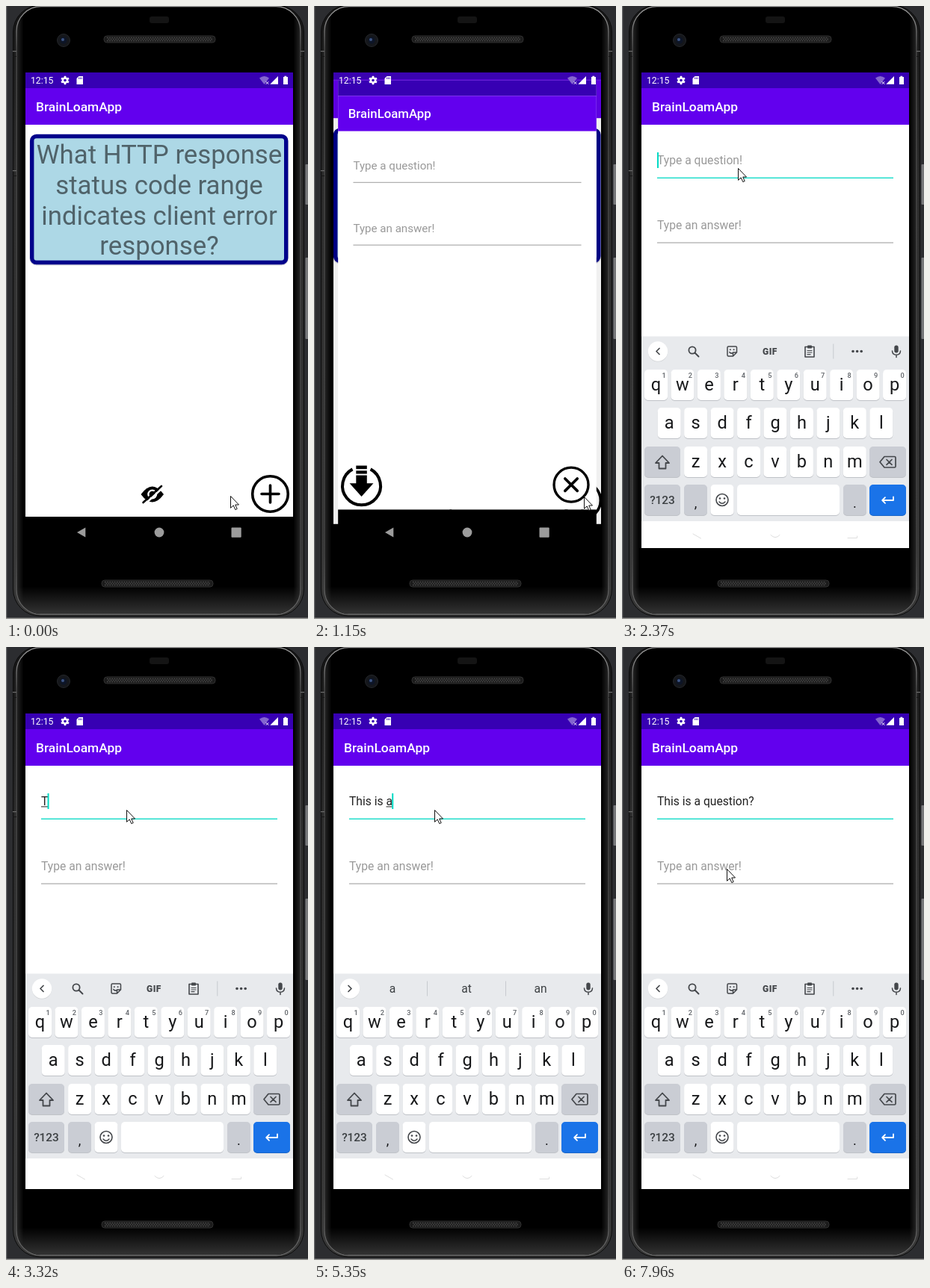
An HTML page that plays this animation: 404 px wide and 821 px high, repeating every 8000 ms.

```html
<!DOCTYPE html>
<html lang="en">
<head>
<meta charset="utf-8">
<title>Study cards demo</title>
<style>
  html, body { margin: 0; width: 100%; height: 100%; overflow: hidden; background: #2c2d30; }
  svg { display: block; width: 404px; height: 821px; }
  text { font-family: Roboto, sans-serif; white-space: pre; }
  .mid { text-anchor: middle; }
  .line { fill: none; stroke-linecap: round; stroke-linejoin: round; }
</style>
</head>
<body>
<svg id="stage" viewBox="0 0 404 821"></svg>
<script>
const LOOP = 8000;
const SIZE = 15.66;
const LEFT = 47;

const rect = (x, y, w, h, fill, r = 0, more = '') =>
  `<rect x="${x}" y="${y}" width="${w}" height="${h}" rx="${r}" fill="${fill}" ${more}/>`;
const circle = (x, y, r, fill, more = '') =>
  `<circle cx="${x}" cy="${y}" r="${r}" fill="${fill}" ${more}/>`;
const path = (d, fill, more = '') => `<path d="${d}" fill="${fill}" ${more}/>`;
const line = (d, color, width) =>
  `<path class="line" d="${d}" stroke="${color}" stroke-width="${width}"/>`;
const label = (x, y, size, fill, str, more = '') =>
  `<text x="${x}" y="${y}" font-size="${size}" fill="${fill}" ${more}>${str}</text>`;
const mid = 'class="mid"';

function speaker(x, y) {
  const row = (dy, shift) =>
    `<path d="M${x + 4 + shift} ${y + dy}H${x + 145}" stroke="#4a4a4a" stroke-width="1.6" stroke-dasharray="1.6 1.6"/>`;
  return rect(x, y, 149, 9, '#1b1b1b', 4, 'stroke="#303030"') +
    row(2.5, 0) + row(4.5, 1.6) + row(6.5, 0);
}

function phone() {
  const tick = (x, y) => rect(x, y, 5, 1.2, '#6c6c6c') + rect(x, y + 7, 5, 1, '#161616');
  return rect(0, 0, 404, 821, '#2c2d30') +
    rect(0, 0, 1.2, 821, '#6a6b6d') +
    rect(0, 819.5, 404, 1.5, '#9b9b98') +
    rect(400.5, 212, 4, 54, '#77787a', 1) +
    rect(400.5, 337, 4, 109, '#77787a', 1) +
    rect(9.5, -1, 389, 818, 'url(#metal)', 36, 'stroke="#0b0b0b"') +
    rect(14, 0.7, 380, 814, 'url(#sides)', 33, 'stroke="url(#rim)" stroke-width="1.3"') +
    rect(14.7, 1.4, 378.6, 812.6, 'url(#foot)', 32) +
    tick(9, 60) + tick(9, 220) + tick(394, 60) +
    rect(192, 14, 26, 9, '#141414', 3) +
    circle(77, 46, 8.5, '#15171b', 'stroke="#24262a"') +
    circle(77, 46, 4.5, '#0d1526') + circle(76, 45, 2, '#3d5484') +
    speaker(131, 40) + speaker(128, 769);
}

function bars() {
  return rect(26, 89, 358, 21, '#3700b3') +
    rect(26, 110, 358, 49, '#6200ee') +
    label(40, 141, 17.4, '#fff', 'BrainLoamApp', 'font-weight="500"');
}

function home() {
  const lines = ['What HTTP response', 'status code range', 'indicates client error', 'response?'];
  return rect(26, 89, 358, 595, '#fff') + bars() +
    rect(31.5, 172.5, 346.5, 175, '#d4d4d8', 9) +
    rect(34.7, 174.5, 340, 169, '#add8e6', 6, 'stroke="#00008b" stroke-width="5.4"') +
    lines.map((s, i) => label(205, 211 + i * 40.8, 34.8, '#50636a', s, mid)).join('') +
    path('M180.5 654Q195.7 633 211 654Q195.7 675 180.5 654Z', '#000') +
    circle(195.7, 654, 6.5, '#fff') + circle(195.7, 654, 4.2, '#000') +
    line('M185 668L211 644', '#fff', 2.4) + line('M183.5 665L208 643', '#000', 2.6) +
    circle(353.5, 653.5, 23.8, 'none', 'stroke="#000" stroke-width="3.6"') +
    line('M342 653.5H365M353.5 642V665', '#000', 3.6);
}

function editor() {
  return rect(26, 89, 358, 595, '#fff') + rect(26, 684, 358, 42, '#000') + bars() +
    label(LEFT, 212, SIZE, '#999', 'Type a question!', 'id="hint"') +
    label(LEFT, 212, SIZE, '#212121', '', 'id="typed"') +
    rect(LEFT, 213.4, 0, 1, '#212121', 0, 'id="under"') +
    rect(LEFT, 229.6, 316, 1.3, '#b0b0b0', 0, 'id="field"') +
    rect(LEFT, 196, 2, 21, '#03dac5', 0, 'id="caret"') +
    label(LEFT, 299, SIZE, '#999', 'Type an answer!') +
    rect(LEFT, 316.4, 316, 1.3, '#b0b0b0') +
    path('M71 628A26.4 26.4 0 1 1 46 628', 'none', 'stroke="#000" stroke-width="4.2"') +
    rect(51, 623, 15, 4.8, '#000') + rect(51, 630, 15, 4.4, '#000') +
    path('M51 636.5H66V647.5H75L58.5 666L42 647.5H51Z', '#000') +
    circle(349, 649.5, 23.8, 'none', 'stroke="#000" stroke-width="3.5"') +
    line('M340.5 641L357.5 658M357.5 641L340.5 658', '#000', 3.8);
}

function status() {
  const teeth = [0, 60, 120].map(a =>
    rect(77.6, 93.8, 2.8, 11.4, '#fff', 0.6, `transform="rotate(${a} 79 99.5)"`)).join('');
  return label(33, 104, 12.2, '#fff', '12:15') +
    teeth + circle(79, 99.5, 4.2, '#fff') + circle(79, 99.5, 1.8, '#3700b3') +
    path('M97.5 94H103V105H94.5V97Z', '#fff') +
    path('M97.6 95.5V98M99.4 95.5V98M101.2 95.5V98', 'none', 'stroke="#3700b3" stroke-width=".8"') +
    path('M339 96.5Q345.5 91.5 352 96.5L345.5 105Z', '#8466cf') +
    line('M348 101.5L351 104.5M351 101.5L348 104.5', '#fff', 1) +
    path('M364 94V104.7H353.3Z', '#fff') +
    path('M371 95H372.4V93.8H375.2V95H377V105H371Z', '#fff');
}

function nav() {
  return path('M95 705L106.3 698.5V711.5Z', '#9c9c9c') +
    circle(205, 705, 6.4, '#9c9c9c') + rect(301.5, 698.5, 13.2, 13.2, '#9c9c9c', 1);
}

function keyboard() {
  const pitch = 35.45, ink = '#17181a', grey = '#cacdd4', dim = '#44474b';
  const key = (x, y, w, fill = '#fff', shadow = '#bfc2c7') =>
    rect(x, y + 1, w, 41, shadow, 5) + rect(x, y, w, 41, fill, 5);
  const row = (chars, x, y, base) => [...chars].map((c, i) =>
    key(x + i * pitch, y, 31) + label(x + 15.5 + i * pitch, base, 23.6, ink, c, mid)).join('');
  const digits = [...'1234567890'].map((d, i) =>
    label(56 + i * pitch, 493, 9.2, '#5f6368', d, mid + ' font-weight="500"')).join('');

  const tools =
    line('M50 453.5L46 457.5L50 461.5', dim, 1.7) +
    circle(94, 456, 4.6, 'none', `stroke="${dim}" stroke-width="1.8"`) + line('M97.5 459.5L102.5 464.5', dim, 1.9) +
    line('M142.5 451H152Q153.5 451 153.5 452.5V459L148.5 464H142.5Q141 464 141 462.5V452.5Q141 451 142.5 451ZM148.5 464V459H153.5M143.8 458.5Q145.5 461 148 459.7', dim, 1.5) +
    circle(144.8, 455.3, 1, dim) + circle(149.6, 455.3, 1, dim) +
    label(198, 462, 12, dim, 'GIF', mid + ' font-weight="900" letter-spacing=".5"') +
    line('M245 451.5H257V465H245Z', dim, 1.6) + rect(248, 449.5, 6, 4, dim, 1) +
    line('M248 456.5H254M248 459H254M248 461.7H252', dim, 1.2) +
    rect(282.3, 447.5, 1, 20, '#c7cacf') +
    [309, 314.6, 320.2].map(x => circle(x, 457.5, 1.8, dim)).join('');
  const words =
    line('M46 453.5L50 457.5L46 461.5', dim, 1.7) +
    rect(151, 447.5, 1, 20, '#c7cacf') + rect(256, 447.5, 1, 20, '#c7cacf') +
    [105, 204, 303].map(x => label(x, 463, SIZE, '#3c4043', '', 'class="mid word"')).join('');

  return rect(26, 437.5, 358, 247.5, '#e8eaed') + rect(26, 685, 358, 180, '#fff') +
    circle(48, 458.3, 13.2, '#d3d5d8') + circle(48, 457.5, 13.2, '#fff') +
    `<g id="tools">${tools}</g><g id="words">${words}</g>` +
    rect(364.3, 449.5, 5.4, 10, dim, 2.7) +
    line('M361.5 457Q361.8 462.2 367 462.2T372.5 457M367 462.5V465.5', dim, 1.5) +
    row('qwertyuiop', 30, 482, 510) + digits +
    row('asdfghjkl', 47.7, 533, 561) +
    row('zxcvbnm', 83.1, 585, 613) +
    key(30, 585, 48, grey) + line('M54 597.5L63 607H58.5V614.5H49.5V607H45Z', dim, 1.8) +
    key(331, 585, 49, grey) + line('M351 598.5H364.5Q366 598.5 366 600V611.5Q366 613 364.5 613H351L345 605.8ZM354 602.5L361 609.3M361 602.5L354 609.3', dim, 1.7) +
    key(30, 636, 48, grey) + label(54, 662, 15.4, '#3c4043', '?123', mid + ' font-weight="500"') +
    key(83, 636, 31, grey) + label(98.6, 667, 18, ink, ',', mid) +
    key(118.5, 636, 31) + circle(134, 656.5, 8, 'none', `stroke="${dim}" stroke-width="1.6"`) +
    circle(131, 654.5, 1.3, dim) + circle(137, 654.5, 1.3, dim) + line('M130 659Q134 663.5 138 659', dim, 1.5) +
    key(154, 636, 137) +
    key(296, 636, 31, grey) + label(311.3, 667, 18, ink, '.', mid) +
    key(331, 636, 49, '#1a73e8', '#1a66c8') + line('M363 652.5V657H348.5M352 653.2L348.2 657L352 660.8', '#fff', 1.8);
}

const ghosts = line('M95 707L105.5 713', '#dedede', 1) +
  line('M199 708.5Q205 715 211 708.5', '#dedede', 1) + line('M302 712.5H314.5V710', '#dedede', 1);

const stage = document.getElementById('stage');
stage.innerHTML = `
  <defs>
    <linearGradient id="rim" x1="0" y1="0" x2="0" y2="1">
      <stop offset="0" stop-color="#a5a5a5"/><stop offset=".07" stop-color="#4c4c4c"/>
      <stop offset=".9" stop-color="#444"/><stop offset="1" stop-color="#6a6a6a"/>
    </linearGradient>
    <linearGradient id="metal" x1="0" y1="0" x2="0" y2="1">
      <stop offset="0" stop-color="#161616"/><stop offset=".3" stop-color="#2b2b2b"/>
      <stop offset="1" stop-color="#383838"/>
    </linearGradient>
    <linearGradient id="sides">
      <stop offset="0" stop-color="#262626"/><stop offset=".025" stop-color="#000"/>
      <stop offset=".975" stop-color="#000"/><stop offset="1" stop-color="#262626"/>
    </linearGradient>
    <linearGradient id="foot" x1="0" y1="0" x2="0" y2="1">
      <stop offset=".955" stop-color="#333" stop-opacity="0"/><stop offset="1" stop-color="#333"/>
    </linearGradient>
    <clipPath id="screen"><rect x="26" y="89" width="358" height="637"/></clipPath>
  </defs>
  ${phone()}
  <g clip-path="url(#screen)">
    <g id="home">${home()}</g>
    <g id="shade">${rect(26, 89, 358, 605, '#000', 0, 'opacity=".06"')}
      ${rect(26, 89, 358, 9, '#3a03b0')}${rect(26, 98, 358, 1.5, '#5200cf')}</g>
    <g id="editor">${editor()}</g>
    ${nav()}
    <g id="keys">${keyboard()}</g>
    <g id="ghosts">${ghosts}</g>
  </g>
  ${status()}
  <g id="mouse">${path('M.5 .5V16.3L4.2 12.9L6.8 18.6L9.2 17.5L6.7 12H11.5Z', '#fff', 'stroke="#111" stroke-width="1"')}</g>`;

// Each step changes only the values it names; open = editor transition, drop = keyboard offset.
const steps = [
  [0, { at: [300, 656], open: 0, drop: null, text: '', mark: null, caret: false, words: null }],
  [150, { at: [304, 653] }],
  [300, { at: [318, 643] }],
  [430, { at: [336, 633] }],
  [550, { at: [352, 640] }],
  [670, { at: [360, 652] }],
  [780, { at: [361, 657] }],
  [1150, { open: 0.77 }],
  [1300, { open: 0.97 }],
  [1420, { open: 1, at: [330, 560] }],
  [1550, { at: [222, 306] }],
  [1680, { at: [163, 209] }],
  [1830, { at: [159, 213] }],
  [1980, { at: [156, 216] }],
  [2130, { at: [155, 217] }],
  [2250, { caret: true, drop: 100 }],
  [2370, { drop: 5 }],
  [2520, { drop: 0, at: [158, 217] }],
  [2670, { caret: false, at: [161, 218] }],
  [3040, { caret: true }],
  [3320, { text: 'T', mark: 0 }],
  [3440, { words: ['T', 'The', 'To'] }],
  [3690, { text: 'Th' }],
  [3810, { words: ['Th', 'The', 'That'] }],
  [4090, { text: 'Thi', words: ['Thi', 'This', 'Think'] }],
  [4230, { text: 'This', words: ['This', "This'll", 'Thistle'] }],
  [4510, { text: 'This ' }],
  [4650, { mark: null, words: ['is', 'was', 'one'] }],
  [4790, { text: 'This i', mark: 5, words: ['i', 'is', 'in'] }],
  [4910, { text: 'This is', words: ['is', 'is a', 'isn\'t'] }],
  [5050, { text: 'This is ', mark: null, words: ['a', 'the', 'not'] }],
  [5350, { text: 'This is a', mark: 8, words: ['a', 'at', 'an'] }],
  [5480, { text: 'This is a ', mark: null, words: ['good', 'great', 'very'] }],
  [5620, { text: 'This is a qu', mark: 10, words: ['qu', 'quick', 'quite'] }],
  [5760, { text: 'This is a que', words: ['que', 'question', 'queen'] }],
  [5890, { text: 'This is a quest', words: ['quest', 'question', 'quests'] }],
  [6010, { text: 'This is a questio' }],
  [6140, { text: 'This is a question', words: ['questio', 'question', 'QUESTION'] }],
  [6260, { words: ['question', 'questions', 'questioned'] }],
  [6640, { caret: false }],
  [7040, { text: 'This is a question?', caret: true }],
  [7310, { mark: null, words: null }],
  [7450, { caret: false, at: [160, 234] }],
  [7690, { at: [153, 266] }],
  [7820, { at: [144, 289] }],
  [7960, { at: [140, 297] }]
];

const $ = id => document.getElementById(id);
const show = (id, on) => $(id).setAttribute('display', on ? 'inline' : 'none');
const move = (id, x, y) => $(id).setAttribute('transform', `translate(${x} ${y})`);
const zoom = (id, s) => $(id).setAttribute('transform',
  `translate(205 407.5) scale(${s}) translate(-205 -407.5)`);
const wordEls = document.querySelectorAll('.word');
const pen = document.createElement('canvas').getContext('2d');

function width(str) {
  pen.font = `${SIZE}px Roboto, sans-serif`;
  return pen.measureText(str).width;
}

function draw(time) {
  const s = Object.assign({}, ...steps.filter(([t]) => t <= time).map(step => step[1]));
  const typing = s.drop !== null;

  move('mouse', ...s.at);
  show('home', s.open < 1);
  show('shade', s.open > 0 && s.open < 1);
  show('editor', s.open > 0);
  zoom('home', 1 + 0.046 * s.open);
  zoom('editor', 0.85 + 0.15 * s.open);

  show('keys', typing);
  show('ghosts', typing && s.drop < 20);
  move('keys', 0, s.drop || 0);
  show('tools', !s.words);
  show('words', s.words);
  wordEls.forEach((el, i) => { el.textContent = s.words ? s.words[i] : ''; });

  show('hint', !s.text);
  $('typed').textContent = s.text;
  show('caret', s.caret);
  $('caret').setAttribute('x', LEFT + (s.text ? width(s.text) - 0.8 : 0));
  $('field').setAttribute('fill', typing ? '#03dac5' : '#b0b0b0');

  const marked = s.mark !== null;
  show('under', marked);
  if (marked) {
    $('under').setAttribute('x', LEFT + width(s.text.slice(0, s.mark)));
    $('under').setAttribute('width', width(s.text.slice(s.mark).trimEnd()));
  }
}

const start = performance.now();
function tick() {
  draw((performance.now() - start) % LOOP);
  requestAnimationFrame(tick);
}
tick();
</script>
</body>
</html>
```
